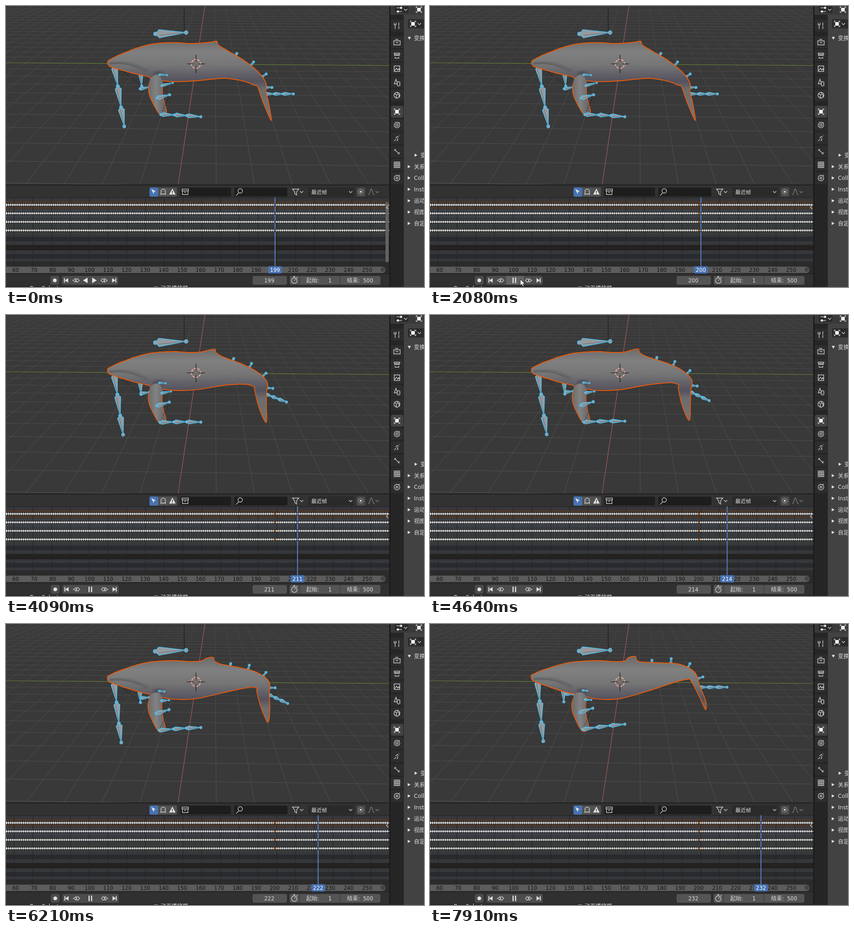
Recreate the animation shown at these times as an HTML page. Size 912x614 px, loop 8 s.

```html
<!DOCTYPE html>
<html lang="zh">
<head>
<meta charset="utf-8">
<style>
html, body { margin: 0; width: 100%; height: 100%; overflow: hidden; background: #232323; }
svg { display: block; width: 912px; height: 614px; }
text { font-family: "DejaVu Sans", "Noto Sans CJK SC", "Noto Sans CJK", sans-serif; font-size: 12px; fill: #dedede; }
.num { font-size: 11.5px; text-anchor: middle; }
.ico { fill: none; stroke: #c8c8c8; stroke-width: 1.4; }
.sol { fill: #e4e4e4; }
.dark { fill: #454545; }
.mark { fill: none; stroke: #333; stroke-width: 1.6; }
.gold { fill: #d27427; stroke: #5b3210; stroke-width: .6; }
.dash { fill: none; stroke: #111; stroke-dasharray: 3 3; }
.bone { fill: #959a9e; stroke: #4bc3f7; stroke-width: 1.4; stroke-linejoin: round; }
</style>
</head>
<body>
<svg viewBox="0 0 912 614">
  <defs>
    <linearGradient id="skin" gradientUnits="userSpaceOnUse" x1="0" y1="72" x2="0" y2="250">
      <stop offset="0" stop-color="#6a6a6a"/><stop offset=".16" stop-color="#808080"/>
      <stop offset=".32" stop-color="#767676"/><stop offset=".44" stop-color="#615f67"/>
      <stop offset=".52" stop-color="#55525c"/><stop offset=".62" stop-color="#6c6c6d"/><stop offset="1" stop-color="#747474"/>
    </linearGradient>
    <linearGradient id="fin" gradientUnits="userSpaceOnUse" x1="311" y1="0" x2="347" y2="0">
      <stop offset="0" stop-color="#6c6c6c"/><stop offset=".45" stop-color="#828282"/><stop offset="1" stop-color="#646468"/>
    </linearGradient>
    <linearGradient id="fade" gradientUnits="userSpaceOnUse" x1="0" y1="0" x2="0" y2="390">
      <stop offset="0" stop-color="#464646"/><stop offset=".35" stop-color="#4a4a4a"/><stop offset="1" stop-color="#525252"/>
    </linearGradient>
    <filter id="soft"><feGaussianBlur stdDeviation="2.5"/></filter>
    <clipPath id="view"><rect width="836" height="390"/></clipPath>
    <clipPath id="sheet"><rect width="836" height="614"/></clipPath>
  </defs>
  <g clip-path="url(#view)">
    <rect width="836" height="390" fill="#393939"/>
    <path id="grid" fill="none" stroke="url(#fade)"/>
    <path d="M0 124L836 130" stroke="#668036" stroke-width="1.2"/>
    <path d="M434 0L375.5 390" stroke="#a85a5a" stroke-width="1.2"/>
    <path d="M388.5 0L389 55" stroke="#141414"/>
    <g id="rig"></g>
    <g fill="none" transform="translate(414.5 126.5)">
      <circle r="10" stroke="#f0e8e8" stroke-width="1.3"/>
      <circle r="10" stroke="#d8402f" stroke-width="1.3" stroke-dasharray="3.93"/>
      <path d="M-20 0H-5M5 0H20M0-20V-5M0 5V20" stroke="#111" stroke-width="1.2"/>
      <circle r="2.3" fill="#f09a52" stroke="#222"/>
    </g>
  </g>
  <g id="timeline" clip-path="url(#sheet)"></g>
  <g id="properties"></g>
  <g id="transport"></g>
  <rect id="bar" x="828" y="428" width="7" height="132" rx="3.5" fill="#626262"/>
  <path d="M834 436l-4 4 4 4" class="ico" stroke-width="1"/>
  <g id="head">
    <path d="M0 418V570" stroke="#5680c2" stroke-width="2"/>
    <rect x="-15" y="568.5" width="30" height="16" rx="3" fill="#4772b3"/>
    <text id="headText" class="num" y="581" style="fill:#fff"></text>
  </g>
  <text id="field" class="num" x="574.5" y="603.5"></text>
  <path id="mouse" d="M0 0V14L3.3 11 5.6 16 8 15 5.8 10H10Z" fill="#fff" stroke="#111" stroke-width=".9"/>
</svg>
<script>
const $ = id => document.getElementById(id);
const rect = (x, y, w, h, fill, r = 0) => `<rect x="${x}" y="${y}" width="${w}" height="${h}" rx="${r}" fill="${fill}"/>`;
const label = (x, y, s, extra = '') => `<text x="${x}" y="${y}" ${extra}>${s}</text>`;
const icon = (x, y, d, cls = 'ico') => `<path transform="translate(${x} ${y})" class="${cls}" d="${d}"/>`;
const ring = r => `M${-r} 0a${r} ${r} 0 1 0 ${2 * r} 0a${r} ${r} 0 1 0 ${-2 * r} 0`;
const chevron = 'M-3.5-1.5L0 2 3.5-1.5';
const frameX = f => 591 + (f - 200) * 4.095;
const mix = (a, b, u) => a.map((v, i) => v + (b[i] - v) * u);
const clamp = v => Math.max(0, Math.min(1, v));

function drawGrid() {
  let d = '';
  for (let k = -24; k <= 24; k++) {
    const slope = -0.15 + 0.157 * k;
    if (k) d += `M${455 + 140 * slope} 0L${455 + 530 * slope} 390`;
  }
  for (let n = -16; n <= 10; n++) {
    const y = 1 / (0.156 * (0.02404 - 0.0012 * n)) - 140;
    const tilt = (y + 140) / 37000;
    if (n) d += `M0 ${y - 414 * tilt}L836 ${y + 422 * tilt}`;
  }
  $('grid').setAttribute('d', d);
}

function drawProperties() {
  let s = rect(836, 0, 3, 614, '#1d1d1d') + rect(839, 0, 29, 614, '#252525') + rect(868, 0, 44, 614, '#424242');
  s += rect(839, 0, 73, 19, '#3a3a3a') + rect(848, -6, 30, 21, '#2b2b2b', 4) + rect(877, 29, 40, 20, '#2b2b2b', 4);
  s += icon(858, 4, 'M-6 0H6') + icon(858, 12, 'M-6 0H6') + icon(862, 4, ring(2.5), 'sol') + icon(855, 12, ring(2.5), 'sol');
  s += icon(872, 8, chevron) + icon(902, 39, chevron);
  // Tool tab, then two evenly spaced groups; the second starts with the open tab.
  const tool = 'M-4 7V-1M-6-6V-2H-2V-6M4-7V0M4 1V7';
  const scene = ['M-7-3H7V6H-7ZM-4-6H3M-3 1H3', 'M-6-5H6V-2H-6ZM-6 0H6M-4 3V6H4V3', 'M-6-6H6V6H-6ZM-5 4L-1-1 2 3 4 0 6 4',
    'M-2-6L-6 4H1ZM1 4a3 3 0 1 0 5 0a3 3 0 1 0-5 0', ring(6.5) + 'M-5-3L0-1-2 3 0 6M2-6L1-3 5-1 4 4'];
  const object = ['', ring(6) + ring(2.5) + 'M3-4L6-6', 'M-6 6L-2 2M-3-1L1-4 4-2M0-1L2 3 0 6M4-6h1', 'M-5-5L-3-2 3 3 5 6M-6-2L-2-5M2 5L6 2',
    'M-6-6H6V6H-6ZM-6-2H6M-6 2H6M-2-6V6M2-6V6', ring(6) + ring(2) + 'M4-5L6-7'];
  const tab = (y, d) => s += rect(840, y - 13, 27, 26, d ? '#2d2d2d' : '#424242', 4) + icon(853, y, d);
  tab(43, tool);
  scene.forEach((d, i) => tab(79 + 29 * i, d));
  object.forEach((d, i) => tab(231 + 29 * i, d));
  for (const [x, y] of [[901, 8], [888, 39], [853, 231]])
    s += icon(x, y, 'M-6-3V-6H-3M3-6H6V-3M6 3V6H3M-3 6H-6V3') + rect(x - 4, y - 4, 8, 8, '#f0f0f0');
  const open = 'M-3.5-2.5H3.5L0 3.5Z', closed = 'M-2.5-3.5V3.5L3.5 0Z';
  s += icon(880, 70, open, 'sol') + label(890, 75, '变换') + icon(894, 326, closed, 'sol') + label(904, 331, '变换');
  ['关系', 'Collections', 'Instancing', '运动路径', '视图显示', '自定义属性'].forEach((name, i) => {
    const y = 351 + i * 24.8;
    s += icon(879, y, closed, 'sol') + label(890, y + 4.5, name);
  });
  $('properties').innerHTML = s;
}

function drawHeader() {
  let s = rect(0, 390, 836, 224, '#1f1f1f') + rect(0, 392, 836, 26, '#323232');
  s += rect(313, 396.5, 60, 20, '#515151', 3) + rect(313, 396.5, 19, 20, '#4772b3', 3);
  s += icon(322, 406, 'M-5-6L5-1 1 0 0 5Z', 'sol') + icon(343, 406, 'M-5 6V-1a5 5 0 0 1 10 0V6L2.5 4 0 6-2.5 4ZM-2-1v1M2-1v1');
  s += icon(363, 406, 'M0-7L7 6H-7Z', 'sol') + icon(363, 406, 'M0-2V2M0 3V5', 'mark');
  s += rect(380, 397, 111, 19, '#1d1d1d', 3) + rect(498, 397, 116, 19, '#1d1d1d', 3);
  s += icon(391, 406, 'M-7-6H7V-2H-7ZM-6-2V6H6V-2M-2 1H2') + icon(511, 404, ring(4.8) + 'M-3 4L-9 10');
  s += icon(632, 406, 'M-7-6H7L2 0V7L-2 4V0Z') + icon(645, 406, chevron);
  s += rect(659, 396.5, 100, 20, '#2a2a2a', 3) + label(666, 410.5, '最近帧', 'style="font-size:11.5px"') + icon(752, 406, chevron);
  s += rect(765, 396.5, 19, 20, '#4b4b4b', 3) + icon(774, 406, ring(2), 'sol');
  return s + `<g opacity=".5">${icon(774, 406, ring(5)) + icon(797, 406, 'M-7 6C-2 6-3-6 0-6S2 6 7 6') + icon(810, 406, chevron)}</g>`;
}

function drawSheet() {
  let s = rect(0, 419, 836, 139, '#35373a') + rect(0, 558, 836, 11, '#2b2b2b') + rect(0, 522, 836, 12, '#242121');
  for (const y of [504, 542]) s += rect(0, y, 836, 10, '#282a2e');
  ['#49382d', '#3d4046', '#383b3e', '#383c39'].forEach((c, i) => s += rect(0, 426 + i * 18.6, 836, 17.6, c));
  for (let f = 60; f <= 250; f += 10) s += rect(frameX(f) - .5, 419, 1, 150, '#242527');
  let keys = '';
  for (let f = 55; f <= 261; f++) keys += `M${frameX(f)}-3.4l2 3.4-2 3.4-2-3.4Z`;
  for (let row = 0; row < 4; row++) {
    const y = 434.5 + row * 18.6;
    s += rect(0, y - 3.4, 836, 6.8, '#111') + icon(0, y, keys, 'sol') + icon(frameX(199), y, 'M0-3.4L2 0 0 3.4-2 0Z', 'gold');
  }
  s += rect(0, 569, 836, 16, '#2b2b2b') + rect(-8, 569.5, 836, 14, '#5c5c5c', 7) + icon(822, 576, ring(5), 'dark');
  for (let i = 0; i < 20; i++) s += label(21 + i * 40.37, 581, 60 + i * 10, 'class="num" style="fill:#151515"');
  return s;
}

function drawFooter() {
  let s = rect(0, 586, 836, 26, '#303030') + rect(0, 612, 836, 2, '#242424');
  s += rect(538, 590, 75, 19, '#545454', 4) + rect(619, 590, 198, 19, '#545454', 4);
  s += rect(640, 590, 1, 19, '#333') + rect(728, 590, 1, 19, '#333');
  s += icon(629, 600, ring(6) + 'M0-9V-6M-2-9H2M0 0L3-3M5-6L7-8');
  s += label(655, 603.5, '起始:') + label(707, 603.5, 1, 'class="num"');
  s += label(744, 603.5, '结束:') + label(790, 603.5, 500, 'class="num"');
  return s + label(52, 621, 'Box Select') + label(322, 621, '▣ 动画播放器');
}

function drawTransport(playing, hover) {
  let s = rect(97, 590, 19, 19, '#4c4c4c', 4) + rect(122, 590, 123, 19, '#4c4c4c', 4);
  if (hover) s += rect(165, 590, 39, 19, '#646464');
  const bar = x => `M${x}-5h2V5h-2Z`;
  s += icon(106.5, 599.5, ring(4), 'sol') + icon(131.5, 599.5, bar(-5) + 'M4-5V5L-3 0Z', 'sol');
  s += icon(153, 599.5, 'M-1-4V4L-7 0ZM3-4L7 0 3 4-1 0Z') + icon(214, 599.5, 'M1-4V4L7 0ZM-3-4L-7 0-3 4 1 0Z');
  s += icon(235.5, 599.5, bar(3) + 'M-4-5V5L3 0Z', 'sol');
  s += playing ? icon(183, 599.5, 'M-4-6H-1.5V6H-4ZM1.5-6H4V6H1.5Z', 'sol')
    : icon(173, 599.5, 'M5-6V6L-5 0Z', 'sol') + icon(193, 599.5, 'M-5-6V6L5 0Z', 'sol');
  $('transport').innerHTML = s;
  $('transport').setAttribute('transform', `translate(${playing ? 1 : 0} 0)`);
}

// Rear outline with the tail low and high: fin tip, back, rump, fluke, belly.
const tailLow = [[460, 77], [484, 98], [518, 118], [549, 143], [567, 168], [567, 188], [572, 207], [579, 250], [562, 213], [549, 177], [541, 173], [518, 164], [475, 158]];
const tailHigh = [[448, 71], [462, 83], [506, 85], [545, 88], [578, 106], [588, 134], [601, 167], [601, 187], [587, 157], [570, 125], [562, 121], [535, 127], [480, 145]];
const topLine = [[222, 121], [227, 117], [242, 109], [264, 100], [285, 92], [310, 85], [338, 81], [370, 80], [400, 82], [425, 81]];
const flipper = [[342, 164], [341, 178], [342, 196], [346, 214], [350, 232], [339, 239], [331, 231], [321, 213], [313, 195], [311, 178], [315, 158]];
const chin = [[306, 153], [290, 150], [270, 145], [245, 138], [225, 131]];

function spline(p) {
  const at = i => p[(i + p.length) % p.length];
  return `M${p[0]}` + p.map((a, i) => {
    const z = at(i - 1), b = at(i + 1), c = at(i + 2);
    return `C${a.map((v, k) => v + (b[k] - z[k]) / 6)} ${b.map((v, k) => v - (c[k] - a[k]) / 6)} ${b}`;
  }).join('') + 'Z';
}

function bone([x1, y1], [x2, y2], w, r = 2.6) {
  const dx = x2 - x1, dy = y2 - y1, len = Math.hypot(dx, dy);
  const sx = x1 + dx * .12, sy = y1 + dy * .12, nx = -dy / len * w, ny = dx / len * w;
  return `<g class="bone"><circle cx="${x1}" cy="${y1}" r="${r}"/>
    <path d="M${x1} ${y1}L${sx + nx} ${sy + ny} ${x2} ${y2} ${sx - nx} ${sy - ny}Z"/>
    <path d="M${sx + nx * .4} ${sy + ny * .4}L${x2} ${y2}" stroke="#555b60" stroke-width=".7"/>
    <circle cx="${x2}" cy="${y2}" r="${r}"/></g>`;
}
const chain = (points, w, r) => points.slice(1).map((p, i) => bone(points[i], p, w, r)).join('');

// The tail rises while the fluke trails behind it in a swing.
function poseTail(u, swing) {
  return tailLow.map((p, i) => {
    const [x, y] = mix(p, tailHigh[i], u);
    const w = Math.sin(Math.PI * clamp((i - 3.5) / 8)) ** 2 * swing;
    return [x - 26 * w, y + 9 * w];
  });
}

// Short bones stand at right angles on the back; a longer chain leaves the tail root.
function drawTailBones(tail, swing) {
  let s = '';
  for (let i = 1; i < 5; i++) {
    const [a, b] = [tail[i], tail[i + 1]], base = mix(a, b, .5);
    const k = (i > 1 ? 8 + i * 1.3 : 5) / Math.hypot(b[0] - a[0], b[1] - a[1]);
    s += bone(base, [base[0] + (b[1] - a[1]) * k, base[1] - (b[0] - a[0]) * k], 2.4, 2.4);
  }
  const [x, y] = tail[5], len = 60 - 17 * swing, angle = .48 * swing;
  const root = [x, y + 4 - 3 * swing];
  const end = [root[0] + len * Math.cos(angle), root[1] + len * Math.sin(angle)];
  return s + chain([0, .31, .63, 1].map(k => mix(root, end, k)), 3.6, 2.4);
}

function drawRig(frame) {
  const u = clamp((frame - 200) / 32), swing = Math.sin(Math.PI * u ** 1.2), lag = u ** 1.4;
  const lift = ([x, y]) => [x - u, y - 8 * u * clamp(1 - (x - 222) / 110)];
  const shift = (x, y, dx, dy) => [x + dx * u, y + dy * u];
  const tail = poseTail(u, swing), [fx, fy] = tail[0];
  const fin = flipper.map(([x, y]) => [x - 4 * u * (y - 150) / 80, y - 4 * u]);
  const outline = spline([...topLine.map(lift), [fx - 14, fy + 2], [fx, fy], [fx + 3, fy + 8], ...tail.slice(1),
    [420, 163 - u], [385, 165], [356, 165 - 2 * u], ...fin, ...chin.map(lift)]);
  const paddle = [[338, 237], [368, 238], [395, 239.5], [425, 242]].map(([x, y]) => {
    const k = (x - 338) / 87;
    return shift(x, y, -5 * (1 - k), -7 - 16 * k);
  });
  const jaw = [[236, 131], [244, 175.5], [251, 221.5], [258, 263]].map(([x, y]) => [x - lag * (y - 110) / 14, y - 7 * lag]);
  const elbow = shift(357, 194, -2, -10);

  $('rig').innerHTML = icon(0, 0, `M255 ${142 - 4 * u}L${shift(296, 175, -4, -5)}M391 64L370 82`, 'dash')
    + chain(jaw, 6.7, 3.2)
    + bone(shift(294, 147, -3, -2), shift(296, 175, -4, -5), 4.5)
    + bone(shift(293, 181, 4, -28), shift(313, 177, 0, -24), 3.5)
    + drawTailBones(tail, swing)
    + `<path d="${outline}" fill="url(#skin)" stroke="#e8580a" stroke-width="1.9" stroke-linejoin="round"/>
      <g transform="translate(0 ${-5 * u})" fill="none" stroke="#4c4a4f">
        <path d="M226 125Q256 121 276 128T309 143" stroke-width="4" opacity=".55" filter="url(#soft)"/>
        <path d="M225 126Q255 123 278 131L294 136" opacity=".7"/>
      </g>
      <ellipse cx="333" cy="${149 - 2 * u}" rx="12" ry="7" fill="#48464f" opacity=".65" filter="url(#soft)"/>
      <path d="${spline([[332, 150], ...fin.map(([x, y]) => [x + (330 - x) * .07, y - 1])])}" fill="url(#fin)"/>`
    + icon(0, 0, `M${elbow}L${paddle[0]}`, 'dash')
    + bone(shift(326, 61, -1, -2), shift(393, 58, 0, -1), 9, 4)
    + bone(shift(335, 150, -2, -5), shift(351, 151, -8, -5), 2, 1.6)
    + bone(shift(339, 174, -1, -9), shift(364, 168, -12, -2), 3, 1.6)
    + bone(shift(330, 201, -3, -8), elbow, 4.5)
    + chain(paddle, 4.4);
}

let shownFrame, shownMode;
function render() {
  const t = performance.now() % 8000;
  const frame = Math.max(199, 200 + Math.floor((t - 2064) / 182));
  if (frame !== shownFrame) {
    shownFrame = frame;
    drawRig(frame);
    $('head').setAttribute('transform', `translate(${frameX(frame)} 0)`);
    $('headText').textContent = $('field').textContent = frame;
  }
  const playing = t >= 1900, hover = t >= 1440 && t < 2610, mode = `${playing}/${hover}`;
  if (mode !== shownMode) {
    shownMode = mode;
    drawTransport(playing, hover);
  }
  const approach = 1 - (1 - clamp((t - 440) / 1000)) ** 3, leave = clamp((t - 2440) / 200);
  const [x, y] = mix([897, 6], [197, 597], approach);
  $('mouse').setAttribute('transform', `translate(${x - 8 * leave} ${y + 18 * leave})`);
  $('mouse').setAttribute('visibility', t >= 440 && leave < 1 ? 'visible' : 'hidden');
  $('bar').setAttribute('opacity', 1 - clamp((t - 440) / 500));
  requestAnimationFrame(render);
}

drawGrid();
$('timeline').innerHTML = drawHeader() + drawSheet() + drawFooter();
drawProperties();
render();
</script>
</body>
</html>
```
